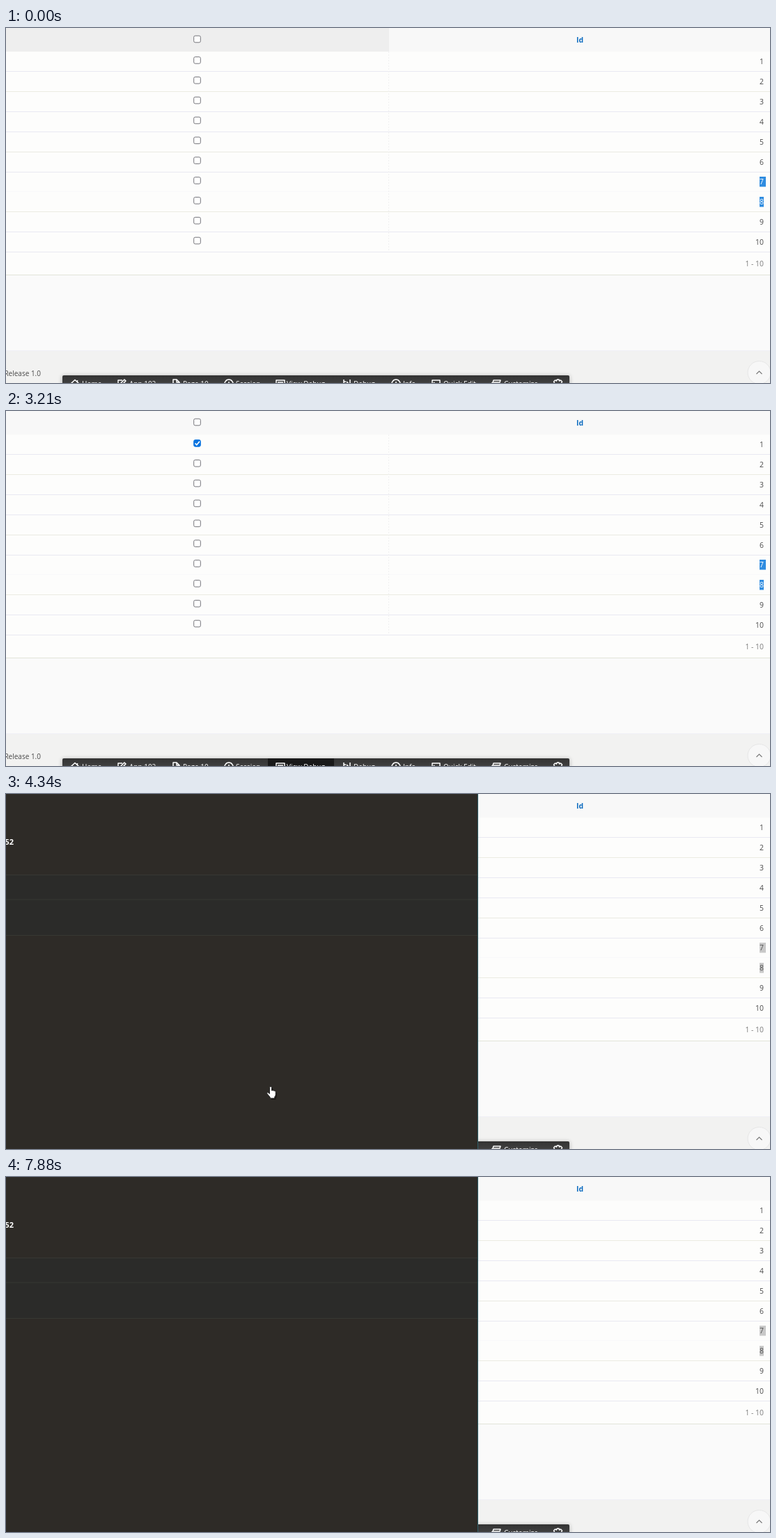
These frames come from a looping animation (1097 px wide and 511 px high, 8000 ms). An HTML page:

```html
<!DOCTYPE html>
<html lang="en">
<head>
<meta charset="utf-8">
<title>Report row selection</title>
<style>
html, body { margin: 0; width: 100%; height: 100%; overflow: hidden; background: #fafafa; }
svg { display: block; width: 1097px; height: 511px; }
text { font-family: "Open Sans", "Noto Sans", sans-serif; font-size: 10.4px; fill: #484848; }
.end { text-anchor: end; }
.bar text { font-size: 10px; fill: #fff; }
.icon { fill: none; stroke: #fff; stroke-width: 1.5; stroke-linejoin: round; }
</style>
</head>
<body>
<svg id="stage" viewBox="0 0 1097 511">
  <defs>
    <filter id="soft" x="-10%" y="-100%" width="120%" height="300%"><feGaussianBlur stdDeviation="3"/></filter>
    <linearGradient id="barFill" x2="0" y2="1"><stop stop-color="#333"/><stop offset="1" stop-color="#404040"/></linearGradient>
  </defs>
  <rect width="1097" height="511" fill="#fafafa"/>
  <rect y="465" width="1097" height="46" fill="#f2f2f1"/>
  <rect y="464" width="1097" height="1" fill="#f0f0f5"/>
  <rect width="1097" height="34" fill="#f8f8f8"/>
  <rect id="headHover" width="550" height="34" fill="#eee"/>
  <rect y="34" width="1097" height="321" fill="#fdfdfc"/>
  <rect id="rowHover" width="1097" height="29" fill="#f8f8f7"/>
  <g id="table"></g>
  <path d="M549.5 34V322" stroke="#f1f1f1" stroke-dasharray="2 2"/>
  <rect y="355" width="1097" height="1" fill="#e2e3d9"/>
  <text x="824" y="21" text-anchor="middle" font-weight="700" style="fill:#0a6abf">Id</text>
  <text class="end" x="1088" y="342.5" style="fill:#7c7c7c">1 - 10</text>
  <text class="end" x="50" y="501" style="font-size:10px">Release 1.0</text>
  <circle cx="1081.5" cy="496" r="16.5" fill="#f7f7f7" stroke="#e6e6e6"/>
  <path d="M1077.5 498l4-4 4 4" fill="none" stroke="#777" stroke-width="1.1"/>
  <rect x="81" y="501" width="728" height="30" fill="#000" opacity=".3" filter="url(#soft)"/>
  <path d="M81 511V502q0-2 2-2H807q2 0 2 2V511Z" fill="url(#barFill)"/>
  <rect id="barHover" x="376" y="500" width="95" height="11" fill="#191919"/>
  <g id="bar" class="bar"></g>
  <g id="popup">
    <rect id="page" width="677" height="511" fill="#fdfdfb"/>
    <g id="dark">
      <rect width="677" height="511" fill="#2e2b27"/>
      <rect y="116" width="677" height="88" fill="#2b2b29"/>
      <path d="M0 116.5H677M0 152H677M0 203.5H677" stroke="#373833"/>
      <text class="end" x="11" y="73" font-weight="700" style="fill:#fff;font-size:11px">52</text>
    </g>
    <path id="edge" d="M677.5 0V511"/>
  </g>
  <g id="arrow">
    <path d="M1.5 2v12l3-2.500 2 4 2.500-1-2-4h4z" fill="#000" opacity=".3"/>
    <path d="M0 0v11.500l2.700-2.400 2 4.200 2-.9-2-4.100h3.700z" fill="#fff" stroke="#222" stroke-width=".9"/>
  </g>
  <g id="hand">
    <path id="palm" d="M-1.500 1.500q0-1.500 1.500-1.500t1.500 1.500v4.500q1-.8 2 0 1-.5 2 .5 1.700-.4 1.700 1.200v3.800q0 2-1.500 3.500v2h-6.500v-1.500l-4.500-5.500q-.5-1.600 1.200-1.500l2.600 2z"/>
  </g>
</svg>
<script>
const LOOP = 8000, PITCH = 28.85, TOP = 33.5;
const $ = id => document.getElementById(id);
const add = (id, html) => $(id).insertAdjacentHTML("beforeend", html);
const show = (id, on) => $(id).style.display = on ? "" : "none";
const place = (id, x, y) => $(id).setAttribute("transform", `translate(${x} ${y})`);

// Table rows
const box = (y, id = "") =>
  `<rect id="${id}" x="269.7" y="${y - 4.8}" width="9.600" height="9.600" rx="2" fill="#fff" stroke="#74747a"/>`;
add("table", box(16, "headBox"));
for (let i = 0; i < 10; i++) {
  const y = TOP + i * PITCH, line = Math.round(y + PITCH);
  const tint = i === 6 ? "#f8f8fa" : i % 3 === 1 ? "#ebebe2" : "#e9e9f2";
  const picked = i === 6 || i === 7;
  const mark = picked
    ? `<rect class="mark" x="1082" y="${Math.round(y + 7.500)}" width="${i === 6 ? 9 : 6}" height="14.500"/>` : "";
  add("table", `<rect y="${line}" width="1097" height="1" fill="${tint}"/>${mark}` +
    `<text class="end${picked ? " picked" : ""}" x="1088" y="${y + 18.800}">${i + 1}</text>` +
    box(y + 12.900, "box" + (i + 1)));
}
add("table", `<path id="tick" d="M271.500 46.500l2.300 2.300 4.200-5" fill="none" stroke="#fff" stroke-width="1.700"/>`);

// Toolbar: icon x, icon path, label x, label
const clock = "M6 0a6 6 0 1 0 .01 0M6 3v4";
const items = [
  [93, "M0 6l6-5.500 6 5.500M2 5v7M9.500 3V1", 109, "Home"],
  [160, "M7 1H1v11M4 8l1-3 5-5 2 2-5 5z", 177, "App 102"],
  [239, "M1 0h5l4 4v8H1zM6 0v4h4", 254, "Page 10"],
  [314, clock, 330, "Session"],
  [388, "M0 1h12v11H0zM2 4h8", 403, "View Debug"],
  [484, "M1 0v10M5 3l5 5M10 0v10M1 3h3", 499, "Debug"],
  [554, clock, 570, "Info"],
  [612, "M0 1h11v11H0zM2 4l2 2", 628, "Quick Edit"],
  [697, "M3 1h10l-1 3H2zM1 4v5h9", 715, "Customize"],
  [786, "M5 0h3l.5 2 2-1 2 2-1 2 1.500 1M5 0l-.5 2-2-1-2 2 1 2-1.500 1", 0, ""]
];
for (const [x, d, tx, label] of items)
  add("bar", `<path class="icon" transform="translate(${x} 506)" d="${d}"/><text x="${tx}" y="516">${label}</text>`);

// Hand outline over its own shadow
const palm = $("palm"), shade = palm.cloneNode();
shade.removeAttribute("id");
shade.setAttribute("transform", "translate(1.800 2)");
shade.setAttribute("opacity", ".4");
palm.before(shade);
palm.setAttribute("fill", "#fff");
palm.setAttribute("stroke", "#222");
palm.setAttribute("stroke-width", ".9");

// Pointer steps: time, x, y
const path = [
  [1420, 272, 47], [2000, 272, 47], [2790, 410, 516],
  [4140, 370, 516], [4290, 376, 442], [4340, 380, 421], [4540, 382, 419],
  [4840, 391, 286], [5000, 391, 286], [5130, 477, 40], [5340, 477, 40],
  [5400, 474, 30], [5460, 472, 42], [5840, 472, 42]
];
const smooth = p => p * p * (3 - 2 * p);
function pointer(t) {
  const i = path.findIndex(k => t < k[0]);
  if (i < 1) return null;
  const [t0, x0, y0] = path[i - 1], [t1, x1, y1] = path[i];
  const raw = (t - t0) / (t1 - t0);
  const p = t0 >= 4140 && t0 < 4340 ? raw : smooth(raw);
  return [x0 + (x1 - x0) * p, y0 + (y1 - y0) * p];
}

function draw(t) {
  const at = pointer(t), checked = t >= 1750, popup = t >= 3790, dark = t >= 4340;
  const hand = t >= 4140 && t < 4590;
  const blurred = t >= 3750;
  show("headHover", t < 1420);
  show("popup", popup);
  show("dark", dark);
  $("edge").setAttribute("stroke", dark ? "#2f5f68" : "#5b9da3");

  const row = at && t < 2790 ? Math.floor((at[1] - TOP) / PITCH) : -1;
  show("rowHover", row >= 0 && row < 10);
  $("rowHover").setAttribute("y", Math.round(TOP + row * PITCH));
  show("barHover", !popup && t >= 2000 && (t >= 2790 || at[1] > 500));

  $("box1").setAttribute("fill", checked ? "#0b75e0" : "#fff");
  $("box1").setAttribute("stroke", checked ? "#0b75e0" : "#74747a");
  show("tick", checked);
  for (const m of document.querySelectorAll(".mark")) m.style.fill = blurred ? "#c8c8c8" : "#2f8ce0";
  for (const n of document.querySelectorAll(".picked")) n.style.fill = blurred ? "#505050" : "#fff";

  show("arrow", at && !hand && (t < 2790 || t >= 4590));
  show("hand", at && hand);
  if (at) place(hand ? "hand" : "arrow", ...at);
}

const start = performance.now();
function tick() {
  draw((performance.now() - start) % LOOP);
  requestAnimationFrame(tick);
}
tick();
</script>
</body>
</html>
```
